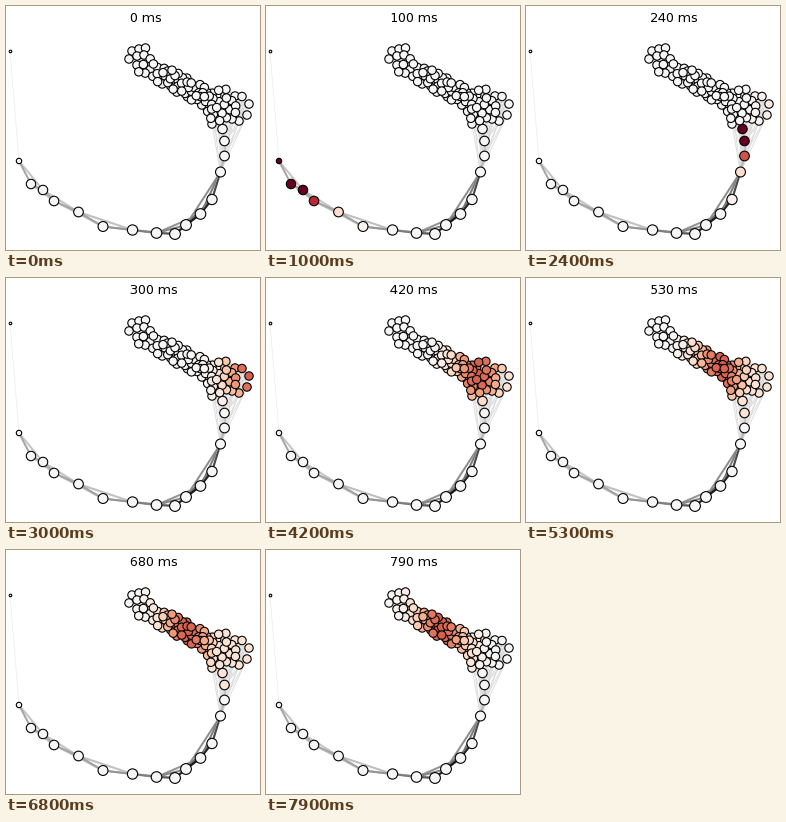
A matplotlib script for the animation above (8 s loop, 254 by 244 pixels).

```python
import numpy as np
import matplotlib.pyplot as plt
from matplotlib.animation import FuncAnimation
from matplotlib.collections import LineCollection

W, H, DPI = 254, 244, 100
FRAMES, INTERVAL, STEP_MS = 80, 100, 10
PT = 72 / DPI

plt.rcParams["text.hinting_factor"] = 1


def bell(d, width):
    return np.exp(-0.5 * (d / width) ** 2)


# Tail of the graph, in order of propagation
chain = np.array([
    (13, 155), (25, 178), (37, 184), (48, 195), (72.5, 206), (97, 220.5),
    (126.5, 224), (150.5, 227), (169, 228), (180, 219), (194.5, 208),
    (206, 193.5), (214.5, 166), (218.5, 150), (218.5, 135), (216.5, 123)])
K = np.arange(len(chain))
chain_r = 4.7 + 0.7 * bell(K - 8.5, 2.5) - 2 * (K == 0)

# Outermost nodes of the dense part
rim = [(126, 45), (133, 43), (139.5, 42), (123, 53), (131, 50), (138, 49),
       (229, 90), (236, 90.5), (243, 98), (241, 109), (233, 115), (226, 113),
       (206, 118)]


def inside(x, y):
    """A slanted band that ends in a round fan."""
    band = 127 < x < 207 and abs(y - 60 - 0.53 * (x - 140)) < 10
    return band or np.hypot(x - 215, y - 99) < 17


def scatter_nodes(points, tries=5000):
    """Add seeded nodes that keep a distance, smallest in the middle."""
    rng = np.random.default_rng(4)
    pts = list(points)
    for x, y in rng.uniform((124, 42), (234, 118), (tries, 2)):
        gap = np.interp(x, [130, 155, 200, 215], [6.5, 3.8, 3.8, 5.5])
        near = np.min(np.hypot(*(np.array(pts) - (x, y)).T))
        if inside(x, y) and near > gap:
            pts.append((x, y))
    return np.array(pts)


cluster = scatter_nodes(rim)
nodes = np.vstack([chain, cluster])
radii = np.r_[chain_r, np.full(len(cluster), 4.2)]
X, Y = nodes.T


def make_edges():
    edges = [((4, 45), chain[0], 0.93, 0.8)]

    def add(a, b, grey, width):
        edges.append((a, b, grey, width))

    for hub in chain[12:]:
        for p in cluster:
            if p[0] > 205 and p[1] > 104:
                add(hub, p, 0.87, 1)

    pairs = [(a, b, np.hypot(*(a - b)))
             for i, a in enumerate(cluster) for b in cluster[i + 1:]]
    for a, b, d in pairs:
        if d < (26 if min(a[0], b[0]) > 195 else 18):
            add(a, b, 0.86, 1)
    for a, b, d in pairs:
        if d < 8 and 140 < a[0] < 208:
            add(a, b, 0.2, 1)

    # Darkest on the right-hand bend, lighter for longer links
    for gap in (3, 2, 1):
        for i in range(len(chain) - gap):
            if gap == 3 and not 6 < i < 10:
                continue
            dark = 0.35 + 0.55 * bell(i + gap / 2 - 9.7, 2)
            dark *= 1 if i + gap < 13 else 0.5
            add(chain[i], chain[i + gap], 1 - dark / gap ** 0.6, 2)

    a, b, grey, width = zip(*edges)
    return LineCollection(list(zip(a, b)), colors=[str(g) for g in grey],
                          linewidths=np.array(width) * PT, zorder=1)


def activity(t):
    """Level of every node at t ms: a pulse on the tail, then a slow wave."""
    height = np.interp(t, [180, 300], [2.5, 0.6])
    pulse = height * bell(K - 0.0983 * (t - 90), 1.3)

    mid = 165 + 78 * np.exp(-(t - 300) / 240)
    wave = 0.6 * np.interp(t, [215, 300], [0, 1]) * bell(X - mid, 18)
    wave *= np.exp(-(np.maximum(0, Y - 104) / 18) ** 2)

    echo = np.interp(t, [430, 530, 680, 720], [0, 0.15, 0.14, 0])
    echo = echo * np.clip((X - 190) / 15, 0, 1) * (Y < 140)

    level = np.maximum(wave, echo)
    level[:len(chain)] = np.maximum(level[:len(chain)], pulse)
    return np.clip(level, 0, 1)


fig = plt.figure(figsize=(W / DPI, H / DPI), dpi=DPI, facecolor="white")
ax = fig.add_axes([0, 0, 1, 1])
ax.set(xlim=(0, W), ylim=(H, 0))
ax.axis("off")
ax.add_collection(make_edges())


def draw_nodes(xs, ys, r, z):
    return ax.scatter(xs, ys, s=(2 * r * PT) ** 2, c=np.zeros(len(xs)),
                      cmap="RdBu_r", vmin=-1, vmax=1, edgecolors="black",
                      linewidths=1.1 * PT, zorder=z)


draw_nodes([3.8], [45], np.array([1.3]), 2)
dots = draw_nodes(X, Y, radii, 3)
label = ax.text(124, 16.3, "", fontsize=9, family="DejaVu Sans",
                va="baseline", ha="left")


def update(i):
    t = i * STEP_MS
    dots.set_array(activity(t))
    label.set_text(f"{t} ms")
    return dots, label


anim = FuncAnimation(fig, update, frames=FRAMES, interval=INTERVAL,
                     repeat=True, repeat_delay=0)
plt.show()
```
